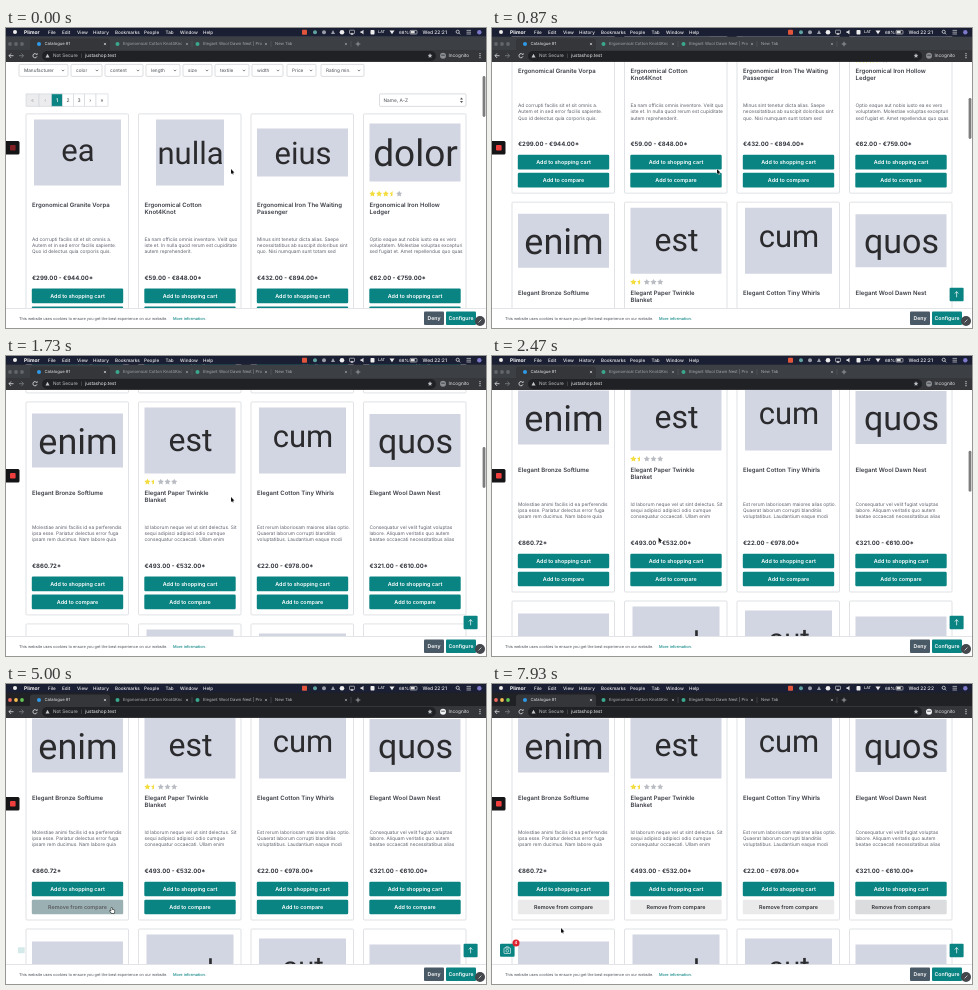
An HTML page with a canvas for the animation above (8000 ms loop, 480x300 px).

```html
<!DOCTYPE html>
<html lang="en">
<head>
<meta charset="utf-8">
<title>Catalogue compare</title>
<style>
  html, body { margin: 0; width: 100%; height: 100%; overflow: hidden; background: #fff; }
  canvas { display: block; width: 480px; height: 300px; }
</style>
</head>
<body>
<canvas id="stage"></canvas>
<script>
const LOOP = 8000;
const TEAL = [10, 132, 130], TEAL_DARK = [8, 104, 104];
const LIGHT = [234, 234, 234], GREY = [193, 195, 197];
const INK = [48, 50, 56], WHITE = [255, 255, 255];
const SANS = 'Inter, "Open Sans", sans-serif';

const canvas = document.getElementById('stage');
const ctx = canvas.getContext('2d');
const dpr = window.devicePixelRatio || 1;
canvas.width = 480 * dpr;
canvas.height = 300 * dpr;
ctx.textRendering = 'geometricPrecision';

// Cards: image text, image width, image height, font size, baseline, title, description, price, stars
const rows = [
  [
    ['ea', 87, 66, 31, 47, 'Ergonomical Granite Vorpa', 'Ad corrupti facilis sit et sit omnis a.|Autem et in sed error facilis sapiente.|Quo id delectus quia corporis quis.', '€299.00 - €944.00*'],
    ['nulla', 68, 66, 31, 50, 'Ergonomical Cotton|Knot4Knot', 'Ea nam officiis omnis inventore. Velit quo|iste et. In nulla quod rerum est cupiditate|autem reprehenderit.', '€59.00 - €848.00*'],
    ['eius', 91, 48, 31, 50.5, 'Ergonomical Iron The Waiting|Passenger', 'Minus sint tenetur dicta alias. Saepe|necessitatibus ab suscipit doloribus sint|quo. Nisi numquam sunt totam sed', '€432.00 - €894.00*'],
    ['dolor', 91, 58, 37, 52, 'Ergonomical Iron Hollow|Ledger', 'Optio eaque aut nobis iusto ea ex vero|voluptatem. Molestiae voluptas excepturi|sed fugiat et. Amet repellendus quo quas', '€62.00 - €759.00*', 3.5]
  ], [
    ['enim', 91, 54, 36, 52.2, 'Elegant Bronze Softlume', 'Molestiae animi facilis id ea perferendis|ipsa esse. Pariatur delectus error fuga|ipsam rem ducimus. Nam labore quia', '€860.72*'],
    ['est', 91, 66, 32, 49, 'Elegant Paper Twinkle|Blanket', 'Id laborum neque vel ut sint delectus. Sit|sequi adipisci adipisci odio cumque|consequatur occaecati. Ullam enim', '€493.00 - €532.00*', 1.5],
    ['cum', 87, 66, 31, 45, 'Elegant Cotton Tiny Whirls', 'Est rerum laboriosam maiores alias optio.|Quaerat laborum corrupti blanditiis|voluptatibus. Laudantium eaque modi', '€22.00 - €978.00*'],
    ['quos', 91, 53, 34, 50.8, 'Elegant Wool Dawn Nest', 'Consequatur vel velit fugiat voluptas|labore. Aliquam veritatis quo autem|beatae occaecati necessitatibus alias', '€321.00 - €610.00*']
  ], [
    ['nostrum', 91, 52, 24, 51.5, '', '', ''], ['sed', 87, 66, 29, 50.5, '', '', ''],
    ['aut', 87, 58, 29, 48, '', '', ''], ['rem', 91, 46, 27, 51, '', '', '']
  ]
];

const scrollKeys = [[0, 0], [530, 73], [1200, 192], [1730, 262], [2200, 285]];
const cursorKeys = [
  [0, 225, 141], [2250, 225, 141], [2700, 105, 224], [5620, 105, 224],
  [5950, 217, 224], [6320, 217, 224], [6620, 330, 224], [6920, 330, 224],
  [7220, 430, 224], [7720, 430, 224], [7930, 69, 244]
];
const hovers = [[2600, 5720], [5860, 6420], [6500, 7030], [7100, 7790]];
const toggles = [[3370, 4970, 5480], [6130], [6740], [7320]];

const clamp = v => Math.max(0, Math.min(1, v));
const ramp = (t, start, length) => clamp((t - start) / length);
const ease = p => p * p * (3 - 2 * p);
const mix = (a, b, p) => a.map((v, i) => v + (b[i] - v) * p);
const rgb = c => `rgb(${c.map(Math.round)})`;

function segment(keys, t) {
  let i = 0;
  while (i < keys.length - 2 && t >= keys[i + 1][0]) i++;
  return i;
}

function scrollAt(t) {
  const k = scrollKeys, i = segment(k, t), span = k[i + 1][0] - k[i][0];
  const p = clamp((t - k[i][0]) / span);
  const slope = j => j === k.length - 1 ? 0 : j === 0 ? 0.12
    : (k[j + 1][1] - k[j - 1][1]) / (k[j + 1][0] - k[j - 1][0]);
  const p2 = p * p, p3 = p2 * p;
  return k[i][1] * (2 * p3 - 3 * p2 + 1) + k[i + 1][1] * (3 * p2 - 2 * p3)
    + span * (slope(i) * (p3 - 2 * p2 + p) + slope(i + 1) * (p3 - p2));
}

function cursorAt(t) {
  const i = segment(cursorKeys, t), a = cursorKeys[i], b = cursorKeys[i + 1];
  return mix(a, b, ease(ramp(t, a[0], b[0] - a[0]))).slice(1);
}

const hoverAt = (i, t) => ramp(t, hovers[i][0], 150) - ramp(t, hovers[i][1], 220);
const addedAt = (i, t) => toggles[i].reduce((v, at, n) => v + (n % 2 ? -1 : 1) * ramp(t, at, 150), 0);

function box(x, y, w, h, fill, radius = 0, stroke) {
  ctx.beginPath();
  ctx.roundRect(x, y, w, h, radius);
  if (fill) { ctx.fillStyle = fill; ctx.fill(); }
  if (stroke) { ctx.strokeStyle = stroke; ctx.lineWidth = 0.6; ctx.stroke(); }
}

function dot(x, y, r, fill) {
  ctx.beginPath();
  ctx.arc(x, y, r, 0, 7);
  ctx.fillStyle = fill;
  ctx.fill();
}

function text(str, x, y, size, fill, weight = 400, align = 'left') {
  ctx.font = `${weight} ${size}px ${SANS}`;
  ctx.textAlign = align;
  ctx.textBaseline = 'middle';
  ctx.fillStyle = fill;
  ctx.fillText(str, x, y);
}

function line(points, stroke, width = 0.8) {
  ctx.beginPath();
  points.forEach(([x, y]) => ctx.lineTo(x, y));
  ctx.strokeStyle = stroke;
  ctx.lineWidth = width;
  ctx.stroke();
}

function shape(points, fill, stroke, width = 0.7) {
  ctx.beginPath();
  points.forEach(([x, y]) => ctx.lineTo(x, y));
  ctx.closePath();
  ctx.lineWidth = width;
  if (stroke) { ctx.strokeStyle = stroke; ctx.stroke(); }
  ctx.fillStyle = fill;
  ctx.fill();
}

// A share of 0.5 shows only the left half of the star.
function star(x, y, share) {
  const points = Array.from({ length: 10 }, (_, i) => {
    const r = i % 2 ? 1.6 : 3.2, a = i * Math.PI / 5 - Math.PI / 2;
    return [x + r * Math.cos(a), y + r * Math.sin(a)];
  });
  ctx.save();
  ctx.beginPath();
  ctx.rect(x - 4, y - 4, share === 0.5 ? 4 : 8, 8);
  ctx.clip();
  shape(points, share > 0 ? '#f3dc3c' : '#b9bcc2');
  ctx.restore();
}

function button(label, x, y, fill, color) {
  box(x - 0.2, y - 7.3, 91.4, 14.6, rgb(fill), 1.2);
  text(label, x + 45.5, y, 5.4, rgb(color), 600, 'center');
}

function card([word, w, h, size, baseline, title, description, price, stars], x, y, hover, added) {
  box(x, y, 102.5, 213, '#fff', 1, '#cbced3');
  const cx = x + 51.5, cy = y + 38.5;
  box(cx - w / 2, cy - h / 2, w, h, '#d2d6e2');
  ctx.font = `400 ${size}px Roboto, sans-serif`;
  ctx.textAlign = 'center';
  ctx.textBaseline = 'alphabetic';
  ctx.fillStyle = '#2b2b2e';
  ctx.fillText(word, cx + 0.5, y + baseline);

  if (stars) for (let i = 0; i < 5; i++) star(x + 8.9 + i * 6.7, y + 80, stars - i);
  title.split('|').forEach((s, i) => text(s, x + 6, y + 91.5 + i * 6.5, 6, '#3a3d45', 600));
  description.split('|').forEach((s, i) => text(s, x + 6, y + 125.5 + i * 6.2, 4.8, '#5c606b'));
  text(price, x + 6, y + 164.3, 6, '#30333b', 700);
  button('Add to shopping cart', x + 6, y + 182, TEAL, WHITE);
  const fill = mix(mix(TEAL, TEAL_DARK, hover), mix(LIGHT, GREY, hover), added);
  button(added > 0.4 ? 'Remove from compare' : 'Add to compare', x + 6, y + 200, fill, mix(WHITE, INK, added));
}

function chevron(x, y) {
  line([[x - 1.3, y - 0.6], [x, y + 0.7], [x + 1.3, y - 0.6]], '#555', 0.7);
}

function listingHead() {
  const filters = [['Manufacturer', 13, 49], ['color', 65, 31], ['content', 99, 38], ['length', 140, 34],
    ['size', 177, 29], ['textile', 209, 34], ['width', 246, 31], ['Price', 281, 29], ['Rating min.', 315, 43]];
  for (const [label, x, w] of filters) {
    box(x, 36.5, w, 12, '#fff', 1, '#c3c6cc');
    text(label, x + 5, 42.5, 4.7, '#4a4d55');
    chevron(x + w - 5, 42.5);
  }
  ['«', '‹', '1', '2', '3', '›', '»'].forEach((label, i) => {
    const x = 20 + [0, 13, 25.5, 36.5, 47.5, 58.5, 70][i], w = [13, 12.5, 11, 11, 11, 11.5, 12][i];
    box(x, 66, w, 12.5, i === 2 ? rgb(TEAL) : i < 2 ? '#ececee' : '#fff', 0, '#d0d3d8');
    text(label, x + w / 2, 72.2, 5, i === 2 ? '#fff' : i < 2 ? '#999' : '#444', i === 2 ? 600 : 400, 'center');
  });
  box(373.5, 66, 86.5, 12.5, '#fff', 1, '#c3c6cc');
  text('Name, A-Z', 377.5, 72.2, 4.8, '#4a4d55');
  shape([[454, 71.5], [457, 71.5], [455.5, 69.5]], '#555');
  shape([[454, 73], [457, 73], [455.5, 75]], '#555');
}

function page(t) {
  const scroll = scrollAt(t);
  box(0, 34, 480, 266, '#fff');
  ctx.save();
  ctx.translate(0, -scroll);
  listingHead();
  rows.forEach((row, r) => row.forEach((item, i) => {
    const y = 86 + r * 222;
    if (y - scroll > 290 || y - scroll < -190) return;
    const active = r === 1;
    card(item, 20 + 112.5 * i, y, active ? hoverAt(i, t) : 0, active ? addedAt(i, t) : 0);
  }));
  ctx.restore();

  ctx.globalAlpha = 1 - ramp(t, 2700, 250);
  box(476.6, 48 + scroll * 0.164, 2.8, 41, '#7d7d7d', 1.4);
  ctx.globalAlpha = ramp(t, 200, 200);
  box(457.6, 259.8, 14, 13.4, rgb(TEAL), 1);
  line([[464.6, 269.3], [464.6, 263.7]], '#fff', 0.7);
  line([[462.8, 265.5], [464.6, 263.6], [466.4, 265.5]], '#fff', 0.7);
  ctx.globalAlpha = 1;
}

function compareBadge(t) {
  const level = ramp(t, 3460, 250) - ramp(t, 4820, 220) + ramp(t, 5560, 220);
  const size = 0.35 + 0.65 * level;
  ctx.save();
  ctx.globalAlpha = level;
  ctx.translate(15.3, 266.2);
  ctx.scale(size, size);
  box(-7.3, -6.5, 14.6, 13, rgb(TEAL), 1);
  box(-3.3, -2.2, 6.5, 5.5, null, 0.5, '#fff');
  line([[-1.8, -2.2], [-1.3, -3.4], [1.2, -3.4], [1.7, -2.2]], '#fff', 0.6);
  ctx.beginPath();
  ctx.arc(0, 0.6, 1.4, 0, 7);
  ctx.stroke();
  ctx.restore();
  if (level < 0.6) return;
  const count = toggles.reduce((n, _, i) => n + (addedAt(i, t - 80) > 0.5), 0);
  dot(24, 259, 3.5, '#e0222f');
  text(Math.max(1, count), 24, 259.1, 4.2, '#fff', 600, 'center');
}

function cookieBar() {
  box(0, 280, 480, 1, '#e3e4e7');
  box(0, 281, 480, 19, '#fff');
  text('This website uses cookies to ensure you get the best experience on our website.', 13, 290.5, 3.9, '#4a4d55');
  text('More information.', 167, 290.5, 3.9, rgb(TEAL), 500);
  box(418, 283.5, 20, 13.5, '#4a5966', 1);
  text('Deny', 428, 290.3, 5.2, '#fff', 600, 'center');
  box(440, 283.5, 30, 13.5, rgb(TEAL), 1);
  text('Configure', 455, 290.3, 5.2, '#fff', 600, 'center');
  dot(474, 293, 5, '#44474c');
  line([[472.6, 294.4], [475.4, 291.6]], '#ddd', 0.8);
}

function menuBar(t) {
  box(0, 0, 480, 8.5, '#1b1f33');
  dot(9, 4, 2, '#eee');
  text('Plimor', 18, 4.2, 5, '#fff', 700);
  const items = [['File', 42], ['Edit', 56], ['View', 71], ['History', 87], ['Bookmarks', 109],
    ['People', 138], ['Tab', 159.5], ['Window', 174], ['Help', 197]];
  items.forEach(([label, x]) => text(label, x, 4.2, 4.6, '#eee', 500));
  box(296, 1.7, 5, 5, '#e2553d', 0.8);
  dot(309, 4.2, 2, '#5fa3a0');
  dot(318, 4.2, 2, '#9a9da8');
  shape([[325, 6], [327, 2], [329, 6]], '#9a9da8');
  dot(336, 4.2, 2.3, '#eee');
  box(343.5, 2.2, 5, 3.4, null, 0.5, '#ddd');
  shape([[344.5, 6.8], [346, 4.6], [347.5, 6.8]], '#ddd');
  shape([[354.5, 3.3], [355.7, 3.3], [357.5, 1.8], [357.5, 6.6], [355.7, 5.1], [354.5, 5.1]], '#ddd');
  box(364.5, 2, 4, 4.6, '#eee', 0.8);
  text('LAT', 375.5, 4.3, 3.8, '#eee', 500, 'center');
  shape([[383.5, 2.6], [388.5, 2.6], [386, 6.2]], '#eee');
  text('68%', 393, 4.2, 4.4, '#eee', 500);
  box(404, 2.4, 7, 3.6, null, 0.7, '#ddd');
  box(404.7, 3, 4, 2.4, '#ddd');
  text(t < 7400 ? 'Wed 22:21' : 'Wed 22:22', 416.5, 4.2, 4.9, '#eee', 500);
  ctx.beginPath();
  ctx.arc(451.7, 3.8, 1.6, 0, 7);
  ctx.strokeStyle = '#eee';
  ctx.lineWidth = 0.7;
  ctx.stroke();
  line([[452.8, 5], [454.2, 6.4]], '#eee', 0.7);
  [2.4, 4.2, 6].forEach(y => line([[460.5, y], [465, y]], '#eee', 0.6));
  dot(473.3, 4.2, 2.2, '#7d78c8');
}

function tab(label, x, width, closeX, icon, color) {
  if (icon) dot(x - 5.5, 16, 2, icon);
  ctx.save();
  ctx.beginPath();
  ctx.rect(x, 10, width, 12);
  ctx.clip();
  text(label, x, 16, 4.2, color);
  ctx.restore();
  line([[closeX - 1.1, 14.9], [closeX + 1.1, 17.1]], color, 0.6);
  line([[closeX - 1.1, 17.1], [closeX + 1.1, 14.9]], color, 0.6);
}

function browser(t) {
  const focused = t >= 2930;
  const dim = focused ? '#b5b8bd' : '#a5a8ad';
  const badge = focused ? '#f1f3f4' : '#8b8e93';
  box(0, 8.5, 480, 13.5, focused ? '#202124' : '#3c3f43');
  ['#ee6a5f', '#f5bd4f', '#61c454'].forEach((c, i) => dot(4 + i * 6, 16, 1.9, focused ? c : '#63666a'));
  box(24, 10.5, 80, 12, '#35363a', [3, 3, 0, 0]);
  tab('Catalogue #1', 38.5, 56, 99, '#2f9be8', '#e8eaed');
  tab('Ergonomical Cotton Knot4Knot', 117, 59, 181, '#3aa78f', dim);
  tab('Elegant Wool Dawn Nest | Products', 197, 59, 260, '#3aa78f', dim);
  tab('New Tab', 269, 59, 340, null, dim);
  [186, 265, 345].forEach(x => line([[x, 13], [x, 19]], '#5f6368', 0.5));
  line([[349.7, 16], [354.3, 16]], dim);
  line([[352, 13.7], [352, 18.3]], dim);

  box(0, 22, 480, 12, '#35363a');
  line([[5, 25.5], [3, 27.7], [5, 29.9]], '#e0e2e5');
  line([[3, 27.7], [7.5, 27.7]], '#e0e2e5');
  line([[15.5, 25.5], [17.5, 27.7], [15.5, 29.9]], '#7c7f84');
  line([[13, 27.7], [17.5, 27.7]], '#7c7f84');
  ctx.beginPath();
  ctx.arc(29, 27.7, 2.1, 0.3, 5.4);
  ctx.strokeStyle = '#e0e2e5';
  ctx.stroke();
  shape([[29.6, 26.8], [31.5, 26.8], [31.5, 24.9]], '#e0e2e5');
  box(36, 23, 394, 10, '#202124', 5);
  shape([[39.5, 29.6], [43.5, 29.6], [41.5, 25.8]], '#c4c7cb');
  text('Not Secure', 47, 27.8, 4.7, '#c4c7cb');
  line([[75.5, 25.5], [75.5, 30]], '#5f6368', 0.5);
  text('justashop.test', 79, 27.8, 4.7, '#eceef0');
  ctx.save();
  ctx.translate(424, 27.7);
  ctx.scale(0.75, 0.75);
  star(0, 0, 0);
  ctx.restore();
  dot(437, 27.7, 3, badge);
  line([[435.2, 27.2], [438.8, 27.2]], '#35363a');
  text('Incognito', 442.5, 27.8, 4.7, '#e4e6e9');
  [25.7, 27.7, 29.7].forEach(y => dot(474, y, 0.6, '#e4e6e9'));
}

function recorder(t) {
  box(0, 113, 13.5, 13.5, '#151517', [0, 1.5, 1.5, 0]);
  box(4, 117, 5.6, 5.6, rgb(mix([130, 32, 36], [240, 62, 62], ramp(t, 60, 250))), 0.8);
}

function cursor(t) {
  const [x, y] = cursorAt(t);
  const pointing = hovers.some(([a, b]) => t >= a && t < b);
  ctx.save();
  ctx.translate(x, y);
  ctx.scale(0.85, 0.85);
  ctx.lineJoin = 'round';
  if (pointing) {
    shape([[0.3, 0], [1.4, 0], [1.5, 2], [3.9, 2.5], [4.3, 3.3], [3.7, 6], [0.7, 6], [-1.3, 3.5], [-0.8, 2.9], [0.3, 3.7]], '#fff', '#111', 1.2);
  } else {
    shape([[0, 0], [0, 5.8], [1.3, 4.7], [2.2, 6.6], [3.1, 6.2], [2.3, 4.3], [4, 4.2]], '#111', '#fff', 0.9);
  }
  ctx.restore();
}

function draw(now) {
  const t = now % LOOP;
  ctx.setTransform(dpr, 0, 0, dpr, 0, 0);
  page(t);
  compareBadge(t);
  cookieBar();
  browser(t);
  menuBar(t);
  recorder(t);
  cursor(t);
}

const start = performance.now();
function tick() {
  draw(performance.now() - start);
  requestAnimationFrame(tick);
}
tick();
</script>
</body>
</html>
```
